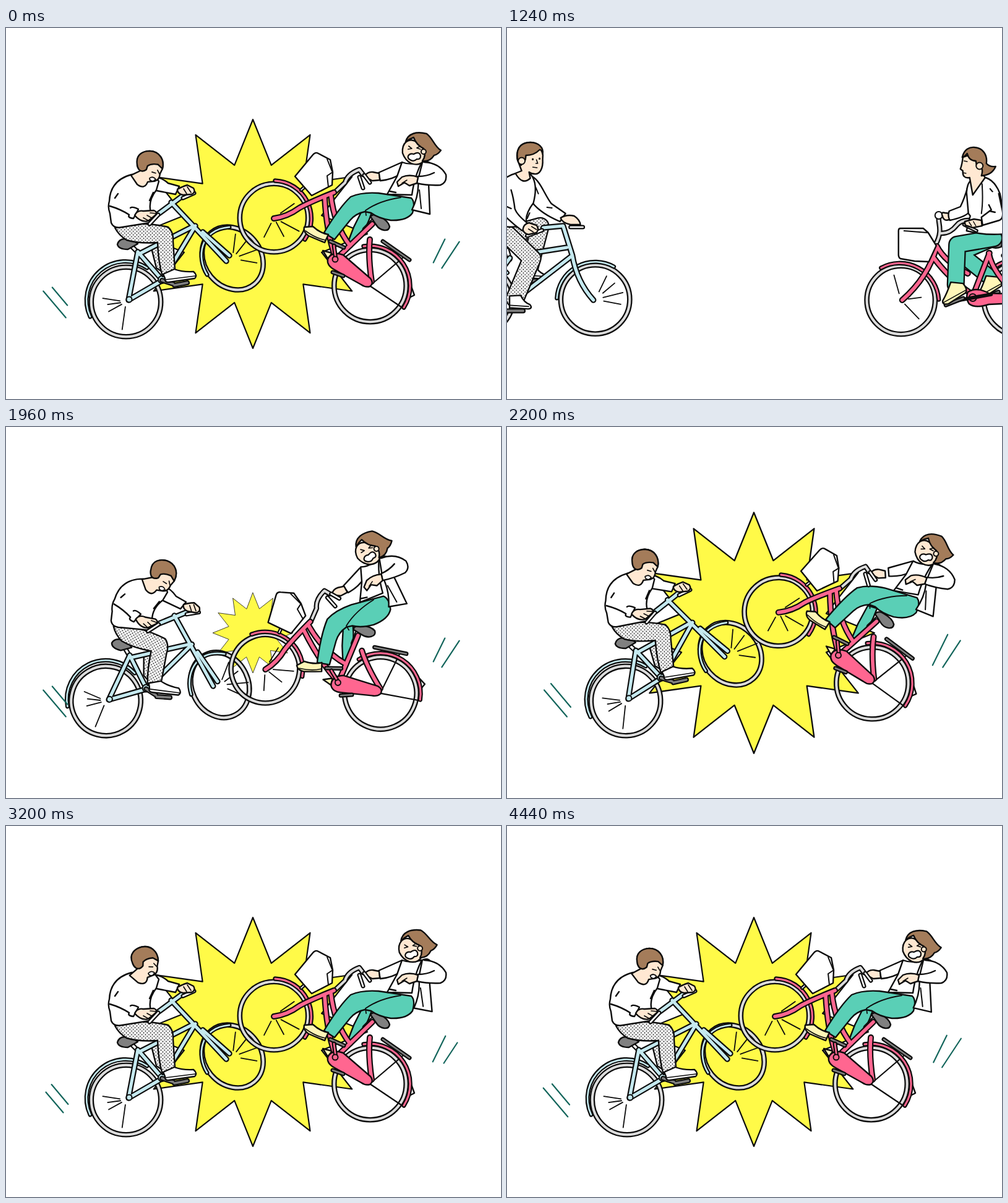
Animation of 800x600 px, one loop 4.48 s. Source, as an HTML page:

```html
<!DOCTYPE html>
<html lang="en">
<head>
<meta charset="utf-8">
<title>Bicycle collision</title>
<style>
html, body { margin: 0; width: 100%; height: 100%; overflow: hidden; background: #fff; }
svg { display: block; width: 100vw; height: 100vh; }
path, line, circle { stroke-linejoin: round; stroke-linecap: round; }
</style>
</head>
<body>
<svg id="stage" viewBox="0 0 800 600"></svg>
<script>
const INK = '#0c0c0c', BLUE = '#c5e9ef', PINK = '#ff6690', GREEN = '#5acfb6', HAIR = '#a47c5a',
  SKIN = '#ffe8d2', GREY = '#808080', STEEL = '#dcdcdc', CREAM = '#fff6b8', TEAL = '#14665c', YELLOW = '#fffa48';
const LOOP = 4480, OUT = 280, ENTER = 520, HIT = 1920, PEAK = 2120, REST = 2280, NOD = 2580, MARK = 1680;

// ---- drawing helpers ----
const shape = (d, fill = '#fff', w = 2.4) =>
  `<path d="${d}" fill="${fill}" stroke="${INK}" stroke-width="${w}"/>`;
const ink = (d, w = 2) => shape(d, 'none', w);
const stroke = (d, c, w) => `<path d="${d}" fill="none" stroke="${c}" stroke-width="${w}"/>`;
const tube = (d, c, w) => stroke(d, INK, w) + stroke(d, c, w - 4.4);
const disc = (x, y, r, fill = '#fff') =>
  `<circle cx="${x}" cy="${y}" r="${r}" fill="${fill}" stroke="${INK}" stroke-width="2"/>`;
const group = (id, body) => `<g id="${id}">${body}</g>`;
// a turned wheel is narrower across its steering axis
const rim = (x, y, r, across = r, tilt = 0) => [[INK, 8.6], [STEEL, 4]].map(([c, w]) =>
  `<ellipse cx="${x}" cy="${y}" rx="${r - 4.3}" ry="${across - 4.3}" transform="rotate(${tilt} ${x} ${y})"
    fill="none" stroke="${c}" stroke-width="${w}"/>`).join('');
// each spoke: angle in degrees, inner and outer radius
const spokes = (x, y, list) => list.map(([deg, r0, r1]) => {
  const a = deg * Math.PI / 180, c = Math.cos(a), s = Math.sin(a);
  return ink(`M${x + c * r0} ${y + s * r0}L${x + c * r1} ${y + s * r1}`, 1.8);
}).join('');

function star(n, R, r) {
  let d = '';
  for (let i = 0; i < 2 * n; i++) {
    const a = i * Math.PI / n, q = i % 2 ? r : R;
    d += `${i ? 'L' : 'M'}${Math.sin(a) * q} ${-Math.cos(a) * q}`;
  }
  return d + 'Z';
}

const legSvg = (id, paints, w, shoe) => group(id,
  `<path fill="none" stroke="${INK}" stroke-width="${w}"/>` +
  paints.map(p => `<path fill="none" stroke="${p}" stroke-width="${w - 4.6}"/>`).join('') +
  `<g>${shoe}</g>`);

// ---- riders on their way ----
const manShoe = tube('M-12 20H13', GREY, 8) + shape('M-9 -4L9 -5Q14 6 24 10Q29 16 21 17L-9 15Z') + ink('M-9 11L22 13', 1.6);
const manRide =
  rim(77, 439, 60) + group('manSpinB', spokes(77, 439, [[32, 13, 33], [65, 12, 32]])) +
  tube('M14 437A63 63 0 0 1 124 396', BLUE, 7) +
  legSvg('manFar', ['#fff', 'url(#dots)'], 30, manShoe) +
  rim(266, 439, 60) + group('manSpinF', spokes(266, 439, [[201, 14, 42], [176, 13, 46], [150, 16, 41], [126, 14, 42]])) +
  tube('M204 437A62 62 0 0 1 296 386', BLUE, 7) +
  tube('M122 354L128 374', '#fff', 8) +
  tube('M128 372L81 437L146 432L229 368M150 366L220 355M182 323L214 320L229 368Q236 410 263 440', BLUE, 9.6) +
  disc(81, 437, 4.5, BLUE) +
  shape('M102 352Q100 343 110 342Q126 346 141 347L138 354Q118 358 106 357Z', GREY) +
  `<path id="manCrank" fill="none" stroke="${INK}" stroke-width="6"/>` + disc(146, 430, 5, BLUE) +
  legSvg('manNear', ['#fff', 'url(#dots)'], 31, manShoe) +
  shape('M164 240C178 248 184 270 195 284L218 300L209 313Q178 300 164 282Z') +
  shape('M138 235C118 240 109 252 109 270Q108 300 103 318Q128 325 156 319Q150 304 166 283Q174 252 162 237Z') +
  ink('M170 258L174 268M188 290L196 291M156 308L160 299') +
  tube('M226 322H246', '#fff', 7) +
  shape('M210 307Q220 301 232 304Q241 310 242 318L226 318Q212 315 210 307Z', SKIN) +
  `<path d="M109 268L112 296Q130 315 148 328L158 317Q139 302 136 292Q134 275 130 262Z" fill="#fff"/>` +
  ink('M109 268L112 296Q130 315 148 328L158 317Q139 302 136 292Q134 275 130 262M121 288L130 292', 2.4) +
  tube('M156 336L180 327', '#fff', 7) +
  shape('M149 326Q150 317 159 315L171 319Q176 325 171 331L158 334Q150 332 149 326Z', SKIN) +
  ink('M158 325L166 330M163 321L171 326', 1.6) +
  shape('M140 212C137 193 150 185 161 185C175 185 183 195 181 212C182 228 176 237 168 236Q163 236 159 233L161 243Q148 255 137 235L147 231Z', SKIN) +
  shape('M140 210C138 190 150 185 161 185C174 185 183 193 181 204Q179 196 176 197Q167 206 154 206L153 213L146 222Q140 217 140 210Z', HAIR) +
  disc(147, 215, 5.5, SKIN) + ink('M165 212V212.5M176 211V211.5', 3) + ink('M171 213L173 219L170 219M165 225L172 226', 1.6);

const womanShoe = tube('M-16 33L12 22', GREY, 7) +
  shape('M-8 -4L12 -2Q20 8 16 13L-12 31Q-22 33 -21 26Q-14 14 -8 -4Z', CREAM) + ink('M-20 29L16 9', 1.6);
const womanRide =
  shape('M750 404L757 411L751 417Z') + rim(690, 439, 62.5) +
  ink('M706 371L690 438H755', 2.2) + tube('M642 393A66 66 0 0 1 754 437', PINK, 7.4) +
  tube('M663 368H717', GREY, 7) +
  rim(498, 440, 59.5) + group('womanSpin', spokes(498, 440, [[261, 9, 42], [207, 12, 33], [170, 10, 28], [109, 11, 42]])) +
  tube('M466 388A63 63 0 0 1 559 439', PINK, 7.4) +
  legSvg('womanFar', [GREEN], 27, womanShoe) +
  tube('M554 350C568 325 555 312 560 303M562 332Q577 333 588 319Q597 307 624 313', STEEL, 8.4) +
  tube('M641 364L614 434M640 364Q644 392 684 432M549 369Q575 405 612 430M556 353Q568 377 606 397M556 353Q542 403 500 440', PINK, 10) +
  shape('M606 427Q620 418 640 429L684 430Q692 432 692 438Q691 444 684 445L640 447Q618 454 608 446Q602 437 606 427Z', PINK) +
  disc(614, 436, 6, PINK) +
  shape('M497 324H534L542 331L555 352L543 378L520 377L497 373Q494 371 494 367V328Q494 324 497 324Z') +
  ink('M503 328L541 331') +
  shape('M640 345L658 341Q663 347 660 354Q650 358 640 353Z', GREY) +
  `<path id="womanCrank" fill="none" stroke="${INK}" stroke-width="6"/>` +
  legSvg('womanNear', [GREEN], 29, womanShoe) +
  disc(559, 303, 6, '#fff') +
  shape('M565 304Q562 297 569 299L578 300L576 310Q567 313 565 304Z', SKIN) +
  shape('M607 253Q601 275 594 289L576 296Q573 304 577 311Q600 306 607 299L610 262Z') +
  shape('M612 246Q605 250 604 266L607 300L610 304Q606 318 604 328Q635 336 665 333Q665 300 658 268Q650 247 635 242Z') +
  ink('M629 252Q631 280 628 300M642 260L647 266') +
  `<path d="M640 268L644 293L628 306L630 319L657 311Q664 308 662 296L654 262Z" fill="#fff"/>` +
  ink('M640 286L644 294L628 306L630 319L657 311Q664 308 662 296L656 268M641 296L650 298', 2.4) +
  tube('M600 318L620 328', '#fff', 6) +
  shape('M601 313L616 309L628 311L629 320L614 323L602 319Z', SKIN) + ink('M608 314L612 320M615 313L619 320', 1.5) +
  shape('M598 209Q597 220 594 228L598 231Q597 244 609 242L614 270L634 242Q628 234 630 222Q615 200 598 209Z', SKIN) +
  shape('M597 209C600 196 609 192 617 193C631 194 638 206 636 219Q641 225 651 224Q645 238 628 239Q633 224 620 221L619 215Q608 215 605 203Q601 208 597 209Z', HAIR) +
  disc(625, 223, 5.5, SKIN) + ink('M600 215L605 216M599 209L605 207M598 234L603 235', 1.7);

// ---- collision ----
const manCrash =
  rim(194, 443, 60.5) + spokes(194, 443, [[189, 10, 38], [172, 9, 30], [151, 8, 32], [98, 8, 45]]) +
  tube('M136 467A63 63 0 0 1 228 388', BLUE, 7) +
  rim(366.3, 372.6, 58.5, 50, 50) + spokes(366, 373, [[-83, 10, 40], [-52, 10, 37], [-20, 12, 46], [10, 14, 40], [215, 10, 24]]) +
  tube('M325 399C308 372 312 326 361 322', BLUE, 7) +
  shape('M234 352L249 346L258 398L243 388Z', 'url(#dotsWhite)') +
  tube('M200 350L212 362', '#fff', 8) +
  tube('M213 362L198 440L253 408L306 320M213 362L253 408M214 366L300 322M247 300L290 268M267 282L312 330L356 377M318 330L361 368', BLUE, 9.4) +
  disc(199, 439, 4.5, BLUE) + disc(252, 407, 6, BLUE) +
  tube('M252 408L270 414M272 416L293 412', GREY, 8) +
  shape('M180 350Q182 342 191 341L207 344L213 349L197 358Q182 358 180 350Z', GREY) +
  shape('M176 323Q215 311 262 322Q271 330 270 345L273 390L253 402Q246 378 245 347Q215 349 195 343Q182 335 176 323Z', 'url(#dotsWhite)') +
  shape('M257 405L254 398L272 390Q285 395 303 394Q310 400 305 405L264 411Q256 412 257 405Z') + ink('M258 407L306 401', 1.6) +
  shape('M235 240Q250 240 262 251L280 256L274 269L243 263Q236 255 235 240Z') +
  shape('M203 237C180 243 168 258 167 280Q164 290 168 300L170 315Q174 325 188 322L232 315L234 298Q229 280 243 262L247 248L238 236Z') +
  `<path d="M171 283L206 308L216 296Q196 288 188 275L178 272Z" fill="#fff"/>` +
  ink('M168 288Q185 293 199 302Q196 307 206 308L214 293Q204 288 201 291M181 268L176 275M238 266L232 279', 2.4) +
  tube('M232 317L246 302M286 275L304 267', '#fff', 7) +
  shape('M208 303Q212 294 222 296L239 295Q246 298 241 303L230 312Q218 315 208 303Z', SKIN) +
  ink('M228 303L237 308M222 307L231 312M233 299L243 300', 1.7) +
  shape('M277 261Q283 257 293 254L303 259Q307 266 300 269L286 270Q277 268 277 261Z', SKIN) +
  ink('M287 260L292 268M293 257L299 266', 1.7) +
  group('manHead',
    shape('M213 220C209 204 225 199 233 199C249 200 256 213 253 228L249 236Q248 246 240 248L229 249Q224 262 212 253L202 238L217 231Z', SKIN) +
    shape('M212 220C210 204 222 199 233 199C248 200 257 213 253 228L246 221Q235 219 229 223L227 229Q220 234 215 229Q212 225 212 220Z', HAIR) +
    ink('M236 233L242 235M245 230L248 236', 1.7) + shape('M232 243Q238 239 242 245L238 248Q232 248 232 243Z', '#fff', 1.8));

const womanCrash =
  shape('M655 418L660 432L652 436Z') + rim(588.5, 417, 62.5) + ink('M642 371L588 417L643 454', 2.2) +
  tube('M578 353A65 65 0 0 1 643 452', PINK, 7.4) +
  tube('M609 345L652 375', GREY, 7) +
  rim(433, 307, 59.5) + spokes(433, 307, [[-35, 13, 40], [-18, 12, 40], [28, 13, 46], [62, 8, 34], [117, 10, 35]]) +
  tube('M435 247A61 61 0 0 1 483 342', PINK, 7.4) +
  tube('M477 262L488 252', '#fff', 6) +
  shape('M577 292L562 322L549 356L570 342Q582 326 592 296Z', GREEN) +
  shape('M512 360L527 364L520 373Z', CREAM) +
  tube('M596 310L580 326', '#fff', 9) +
  tube('M531 266L548 250Q552 236 571 229L577 237', STEEL, 8.4) +
  tube('M592 317L533 374M588 342Q585 370 591 410M515 274Q518 330 532 370M525 270Q530 318 556 352M530 266Q490 282 474 291Q455 305 433 308', PINK, 10) +
  shape('M520 374Q526 360 545 367L589 405Q595 413 588 418Q581 420 574 415L531 391Q518 384 520 374Z', PINK) +
  tube('M524 345L546 355M528 395L545 401', GREY, 7) + tube('M530 352L533 374', PINK, 7) + disc(532, 374, 4.5, PINK) +
  shape('M467 240L496 205Q500 200 505 203L524 213L528 233L527 254L494 271Z') + ink('M528 233L519 239L521 257M519 212L527 232') +
  shape('M589 305Q594 299 603 304Q618 312 620 321Q619 328 611 327Q603 326 598 318Z', GREY) +
  group('womanBody',
    shape('M514 331Q538 291 557 273Q575 265 602 267L655 275Q662 282 657 299Q648 312 622 311Q602 308 590 299L580 297Q565 300 556 311L531 342Z', GREEN) +
    ink('M582 303L581 295Q604 279 638 274', 1.8) +
    shape('M521 334L515 347Q500 341 489 336Q480 330 482 322L496 321Q508 332 521 334Z', CREAM) + ink('M484 328Q500 340 516 343', 1.6) +
    group('flap', shape('M673 217Q686 212 690 228L683 252L685 301L656 294Q668 270 666 245Z') + ink('M668 262L671 292')) +
    shape('M638 218L602 234L605 247Q625 245 637 236L650 222Z') +
    shape('M640 217Q650 221 662 219L672 217Q660 240 656 270L616 269L632 240Z') +
    `<path d="M682 217Q701 219 711 237Q713 250 702 254Q682 255 664 251L666 240L680 238Z" fill="#fff"/>` +
    ink('M676 217Q700 218 711 237Q713 250 702 254Q682 255 664 251L666 240Q680 240 692 234M620 264L630 266', 2.4) +
    shape('M632 249L640 241Q652 236 666 241L664 251L652 255L644 250L634 256Z', SKIN) + ink('M640 251L648 246', 1.6) +
    group('womanHead',
      shape('M647 184Q640 190 641 202Q645 214 655 219Q668 224 676 214L678 200Q660 174 647 184Z', SKIN) +
      shape('M646 184C650 170 664 167 680 171C690 178 692 191 703 198Q698 205 692 206Q685 217 673 215Q680 206 675 195Q664 190 659 177Q653 179 646 184Z', HAIR) +
      disc(675, 200, 4, SKIN) + ink('M651 191L656 195L650 196M670 191L664 194L670 196', 1.7) +
      shape('M650 207Q653 202 659 204Q668 199 670 206Q671 213 664 212Q659 217 653 213Q649 211 650 207Z', '#fff', 2.2))) +
  shape('M579 240Q584 232 593 233L603 235L604 246L592 247Z', SKIN) +
  tube('M571 241L577 259M579 238L588 250', '#fff', 7);

// speed marks: centre, half extents, phase in ms
const MARKS = [[78.5, 447, 20, 23.5, 60], [87, 434, 16, 19, 8], [718.5, 367, 15.5, -23.5, 60], [700, 360.5, 12.2, -24.8, 8]];
const dots = '<circle cx="1.4" cy="1.4" r=".95"/><circle cx="4.2" cy="4.2" r=".95"/>';
const pattern = (id, back) =>
  `<pattern id="${id}" width="5.6" height="5.6" patternUnits="userSpaceOnUse">${back}${dots}</pattern>`;

const stage = document.getElementById('stage');
stage.innerHTML = `<defs>${pattern('dots', '')}${pattern('dotsWhite', '<rect width="6" height="6" fill="#fff"/>')}</defs>` +
  group('ride', group('manRide', manRide) + group('womanRide', womanRide)) +
  group('crash', group('burst', shape(star(12, 185, 115), YELLOW, 2.2)) +
    group('manCrash', manCrash) + group('womanCrash', womanCrash) +
    MARKS.map(() => `<path class="mark" stroke="${TEAL}" stroke-width="2.2"/>`).join(''));

const $ = id => document.getElementById(id);
const move = (id, v) => $(id).setAttribute('transform', v);
const show = (id, on) => $(id).setAttribute('display', on ? 'inline' : 'none');
const marks = [...document.querySelectorAll('.mark')];

// ---- motion ----
const RIDERS = {
  man: { hip: [125, 335], axle: [146, 430], r: 27, thigh: 54, shin: 70, off: [2, -17], side: 1, start: 225 },
  woman: { hip: [648, 340], axle: [615, 436], r: 29, thigh: 60, shin: 65, off: [0, -26], side: -1, start: 60 }
};

function poseLeg(id, m, [px, py]) {
  const [hx, hy] = m.hip, ax = px + m.off[0], ay = py + m.off[1];
  const d = Math.hypot(ax - hx, ay - hy), ux = (ax - hx) / d, uy = (ay - hy) / d;
  const a = (m.thigh ** 2 - m.shin ** 2 + d * d) / (2 * d);
  const h = Math.sqrt(Math.max(0, m.thigh ** 2 - a * a)) * m.side;
  const path = `M${hx} ${hy}L${hx + ux * a + uy * h} ${hy + uy * a - ux * h}L${ax} ${ay}`;
  for (const el of $(id).children) {
    if (el.tagName === 'path') el.setAttribute('d', path);
    else el.setAttribute('transform', `translate(${ax} ${ay})`);
  }
}

function pedal(name, u) {
  const m = RIDERS[name], a = (m.start + m.side * .25 * u) * Math.PI / 180;
  const [cx, cy] = m.axle, x = Math.cos(a) * m.r, y = Math.sin(a) * m.r;
  poseLeg(name + 'Near', m, [cx + x, cy + y]);
  poseLeg(name + 'Far', m, [cx - x, cy - y]);
  $(name + 'Crank').setAttribute('d', `M${cx + x} ${cy + y}L${cx - x} ${cy - y}`);
}

function drawRide(t) {
  const u = t - MARK;
  move('manRide', `translate(${.281 * u} 0)`);
  move('womanRide', `translate(${-.316 * u} 0)`);
  move('manSpinB', `rotate(${.433 * u} 77 439)`);
  move('manSpinF', `rotate(${.433 * u} 266 439)`);
  move('womanSpin', `rotate(${-.331 * u} 498 440)`);
  pedal('man', u);
  pedal('woman', u);
}

// grows past full size, then settles at 1
function impact(t) {
  if (t < PEAK) return 1.108 * Math.sin((t - HIT) / (PEAK - HIT) * Math.PI / 2);
  if (t < REST) return 1.054 + .054 * Math.cos((t - PEAK) / (REST - PEAK) * Math.PI);
  return 1;
}

function drawCrash(t) {
  const k = impact(t), over = Math.max(0, k - 1), under = Math.max(0, 1 - k);
  move('burst', `translate(399 333) scale(${k})`);
  move('manCrash', `translate(${-50 * under - 37 * over} 0) rotate(${22 * under - 37 * over} 194 443)`);
  move('womanCrash', `translate(${26 * under + 37 * over} ${21 * under - 55 * over}) rotate(${37 * over - 36 * under} 588 417)`);
  move('womanBody', `rotate(${120 * over} 640 285)`);
  const back = (1 - Math.cos((Math.max(t, NOD) - NOD) / 480 * 2 * Math.PI)) / 2;
  move('manHead', `rotate(${-25 * back} 214 248)`);
  move('womanHead', `rotate(${-12 * back} 656 243)`);
  move('flap', `rotate(${-4 * back} 668 220)`);
  MARKS.forEach(([x, y, w, h, lag], i) => {
    const s = .83 + .17 * Math.cos((t - 2200 - lag) / 360 * 2 * Math.PI);
    marks[i].setAttribute('d', `M${x - w * s} ${y - h * s}L${x + w * s} ${y + h * s}`);
  });
}

function draw(t) {
  const riding = t >= ENTER && t < HIT, crashed = t < OUT || t >= HIT;
  show('ride', riding);
  show('crash', crashed);
  if (riding) drawRide(t);
  if (crashed) drawCrash(t < OUT ? t + LOOP : t);
}

const began = performance.now();
function tick() {
  draw((performance.now() - began) % LOOP);
  requestAnimationFrame(tick);
}
tick();
</script>
</body>
</html>
```
